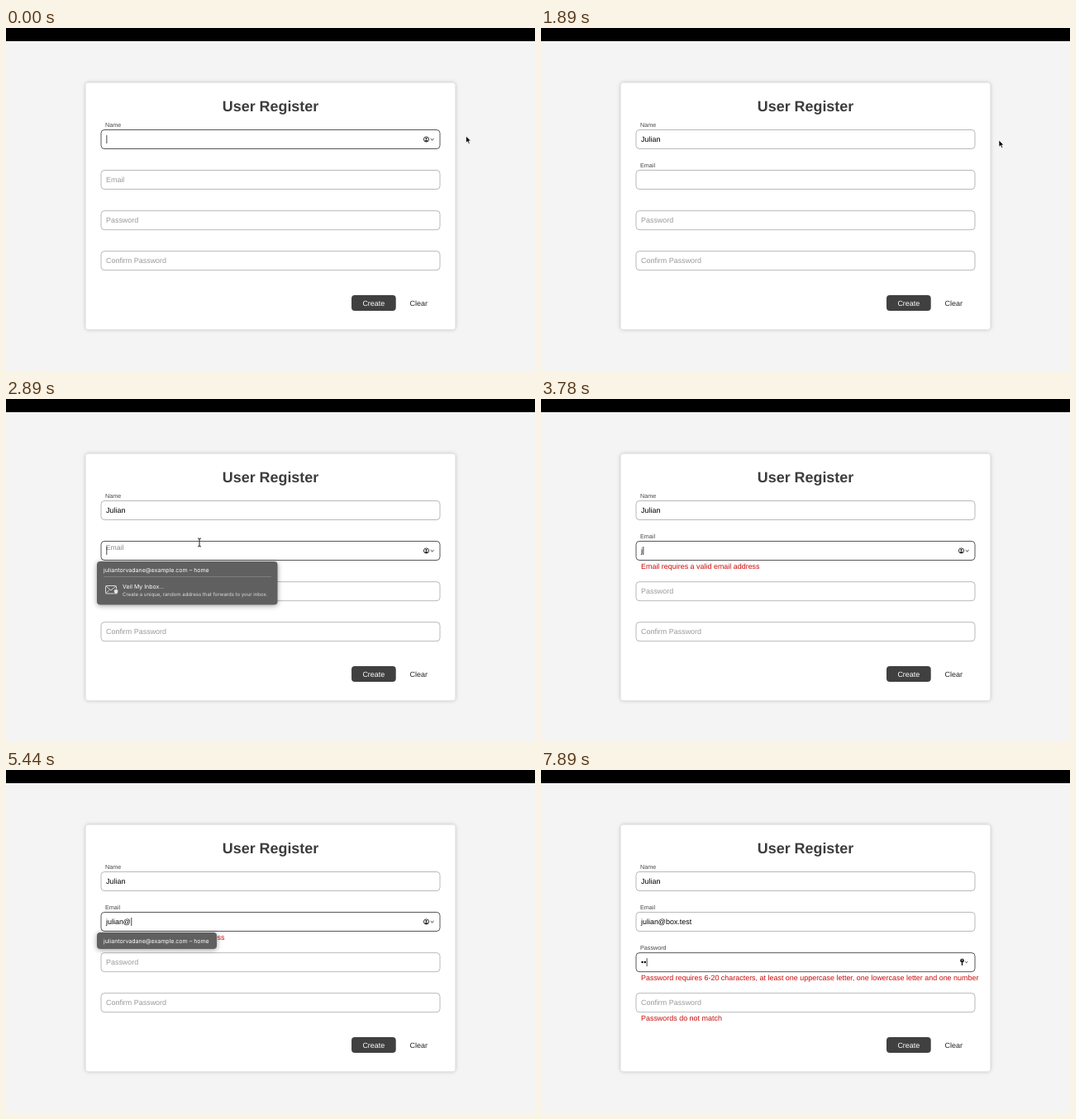
These frames come from a looping animation (640 px wide and 416 px high, 8000 ms). An HTML page:

```html
<!DOCTYPE html>
<html lang="en">
<head>
<meta charset="utf-8">
<title>User Register</title>
<style>
  html, body { margin: 0; width: 100%; height: 100%; overflow: hidden; background: #f4f4f4; }
  svg { display: block; width: 640px; height: 416px; }
  text { font: 8.95px "Liberation Sans", Arial, sans-serif; text-rendering: geometricPrecision; white-space: pre; }
  .card { fill: #fff; filter: drop-shadow(0 0 2.5px rgba(0, 0, 0, .24)); }
  .title { font-size: 17.9px; font-weight: bold; fill: #3c3c3c; }
  .field { fill: #fff; stroke: #b9b9b9; }
  .field.on { stroke: #565656; }
  .hint { fill: #999; }
  .error { fill: #cb0a0a; }
  .panel { fill: #606060; filter: drop-shadow(0 1px 3px rgba(0, 0, 0, .4)); }
  .popup text { font: 7px Inter, sans-serif; fill: #fff; }
  .popup .sub { font-size: 6.05px; fill: #dcdcdc; }
  .rule { stroke: #858585; stroke-width: .8; }
  .line { fill: none; stroke: #222; }
</style>
</head>
<body>
<svg viewBox="0 0 640 416">
  <defs>
    <g id="person">
      <circle r="3.1" class="line" stroke-width=".9"/>
      <circle cy="-.8" r="1.1" fill="#222"/>
      <path d="M-2.1 1.9Q0-.2 2.1 1.9L0 3Z" fill="#222"/>
      <path d="M5.2-.8l1.9 1.8 1.9-1.8" class="line"/>
    </g>
  </defs>
  <rect width="640" height="416" fill="#f4f4f4"/>
  <rect width="640" height="16"/>
  <rect class="card" x="96.5" y="66.5" width="447" height="299" rx="3.5"/>
  <text class="title" x="320" y="101.3" text-anchor="middle">User Register</text>

  <g id="fields"></g>
  <text x="120" y="119.6" style="font-size:7.2px" fill="#444">Name</text>
  <text id="emailLabel">Email</text>
  <text id="passLabel">Password</text>
  <text class="hint" x="121" y="284.7">Confirm Password</text>

  <text id="name" x="121" y="137.8"></text>
  <text id="email" x="121" y="187"></text>
  <text id="pass" x="121" y="236"></text>
  <rect id="caret" width=".9" height="10" fill="#333"/>

  <use id="nameIcon" href="#person" x="508.5" y="135"/>
  <use id="emailIcon" href="#person" x="508.5" y="184"/>
  <g id="passIcon" transform="translate(509.5 233)">
    <circle cy="-1.8" r="2.4" fill="#222"/>
    <path d="M0 0V4" class="line" stroke-width="1.6"/>
    <circle cy="-2.6" r=".6" fill="#fff"/>
    <path d="M3.8-.6l1.4 1.3 1.4-1.3" class="line" stroke-width=".9"/>
  </g>

  <text id="emailError" class="error" x="121" y="206">Email requires a valid email address</text>
  <g id="passError">
    <text class="error" x="121" y="255">Password requires 6-20 characters, at least one uppercase letter, one lowercase letter and one number</text>
    <text class="error" x="121" y="304">Passwords do not match</text>
  </g>

  <rect x="418" y="324" width="53.7" height="19" rx="4" fill="#404040"/>
  <text x="444.8" y="336.6" text-anchor="middle" fill="#fff">Create</text>
  <text x="499.3" y="336.6" text-anchor="middle" fill="#222">Clear</text>

  <g id="namePopup" class="popup">
    <rect class="panel" x="110" y="148" width="123.5" height="49" rx="4"/>
    <rect x="119" y="157" width="16.5" height="13.5" rx="1.5" fill="#f0f0f0"/>
    <circle cx="124" cy="161.8" r="1.8" fill="#555"/>
    <path d="M120.5 168q3.5-5 7 0z" fill="#555"/>
    <circle cx="131" cy="162" r="1.9" fill="none" stroke="#777" stroke-width=".8"/>
    <path d="M129 167.5h4.5" stroke="#999" stroke-width=".8"/>
    <text x="141" y="161.8">Julian Torvadane – Home</text>
    <text class="sub" x="141" y="171">Fill email.</text>
    <path class="rule" d="M118 178H225.5"/>
    <text x="118" y="189.2">Customize...</text>
  </g>

  <g id="emailPopup" class="popup">
    <rect id="emailPanel" class="panel" x="110" y="197" rx="4"/>
    <text x="118" y="210">juliantorvadane@example.com – home</text>
    <g id="emailMore">
      <path class="rule" d="M118 215.5H321"/>
      <g fill="none" stroke="#e4e4e4" stroke-width=".9">
        <rect x="120.5" y="226.5" width="13" height="9.5" rx="1.2"/>
        <path d="M121 227l6 5 6-5M121 235.5l4-4"/>
      </g>
      <path d="M130.5 231.5l2.6-1 2.6 1v2.6q-.4 2.2-2.6 3-2.2-.8-2.6-3z" fill="#e4e4e4" stroke="#606060" stroke-width=".7"/>
      <text x="141" y="230">Veil My Inbox...</text>
      <text class="sub" x="141" y="239.2">Create a unique, random address that forwards to your inbox.</text>
    </g>
  </g>

  <path id="arrow" d="M0 0V8.2L1.9 6.5 3.3 9.4 4.7 8.7 3.4 5.9H5.9Z" stroke="#fff" stroke-width=".7"/>
  <path id="beam" class="line" d="M-2-5Q0-5 0-3.8Q0-5 2-5M0-4V4M-2 5Q0 5 0 3.8Q0 5 2 5"/>
</svg>
<script>
const $ = id => document.getElementById(id);
const TICKS = 72, LOOP = 8000;

// All times below are in ticks, nine per second.
const typing = {
  name: ["Julian", [7, 8, 9, 10, 11, 12]],
  email: ["julian@box.test", [32, 36, 39, 42, 43, 45, 48, 50, 52, 55, 56, 60, 61, 62, 64]],
  pass: ["••", [69, 71]]
};
const focus = {
  name: [[0, 15]],
  email: [[18, 22], [26, 65]],
  pass: [[65, 72]]
};
const shown = {
  namePopup: [[7, 14]],
  emailPopup: [[18, 22], [26, 34], [48, 51]],
  emailMore: [[18, 22], [26, 31]],
  emailError: [[34, 62]],
  passError: [[69, 72]]
};
const caretOff = [[1, 3], [28, 30], [40, 42], [57, 59]];
const pointerOn = [[0, 5], [15, 34]];
const pointerPath = [
  [0, 556.5, 131], [3, 556.8, 140], [4, 557, 149], [15, 550, 141], [17, 554, 136],
  [20, 588, 172], [22, 590, 182], [25, 234, 174]
];
const rowTop = { name: 123.5, email: 172.5, pass: 221.7, confirm: 270.7 };

const boxes = {};
for (const [key, y] of Object.entries(rowTop)) {
  const box = document.createElementNS("http://www.w3.org/2000/svg", "rect");
  const attrs = { class: "field", x: 115, y, width: 410, height: 23, rx: 4 };
  for (const a in attrs) box.setAttribute(a, attrs[a]);
  boxes[key] = $("fields").appendChild(box);
}

const within = (spans, k) => spans.some(([a, b]) => k >= a && k < b);
const show = (id, on) => $(id).setAttribute("visibility", on ? "inherit" : "hidden");
const clamp = v => Math.max(0, Math.min(1, v));
const mix = (a, b, p) => a + (b - a) * p;

function placeLabel(id, top, p) {
  const el = $(id), grey = Math.round(mix(153, 68, p));
  el.setAttribute("x", mix(121, 120, p));
  el.setAttribute("y", mix(top + 14, top - 3.4, p));
  el.style.fontSize = mix(8.95, 7.2, p) + "px";
  el.style.fill = `rgb(${grey},${grey},${grey})`;
}

function pointerAt(k) {
  const i = pointerPath.findIndex(p => p[0] > k);
  if (i < 0) return pointerPath.at(-1).slice(1);
  const [t0, x0, y0] = pointerPath[i - 1], [t1, x1, y1] = pointerPath[i];
  const p = (k - t0) / (t1 - t0);
  return [mix(x0, x1, p), mix(y0, y1, p)];
}

function draw(k) {
  show("caret", false);
  for (const key in typing) {
    const [word, times] = typing[key], el = $(key), on = within(focus[key], k);
    el.textContent = word.slice(0, times.filter(t => t <= k).length);
    boxes[key].classList.toggle("on", on);
    show(key + "Icon", on);
    if (on) {
      const len = el.textContent ? el.getComputedTextLength() : 0;
      $("caret").setAttribute("x", 121.4 + len);
      $("caret").setAttribute("y", rowTop[key] + 6.5);
      show("caret", !within(caretOff, k));
    }
  }
  for (const id in shown) show(id, within(shown[id], k));
  if (!within(shown.emailPopup, k)) show("emailMore", false);

  const large = within(shown.emailMore, k);
  $("emailPanel").setAttribute("width", large ? 218.5 : 145);
  $("emailPanel").setAttribute("height", large ? 52.5 : 20);

  const rise = start => clamp((k - start) / 2);
  placeLabel("emailLabel", rowTop.email, k < 22 ? rise(15) : k < 25 ? 1 - rise(22) : rise(25.6));
  placeLabel("passLabel", rowTop.pass, rise(64));

  const [x, y] = pointerAt(k), inField = x < 525, on = within(pointerOn, k);
  show("arrow", on && !inField);
  show("beam", on && inField);
  for (const id of ["arrow", "beam"]) $(id).setAttribute("transform", `translate(${x} ${y})`);
}

let last = -1;
const start = performance.now();
function frame() {
  const t = (performance.now() - start) % LOOP;
  const k = Math.floor(t * TICKS / LOOP + .05) % TICKS;
  if (k !== last) draw(last = k);
  requestAnimationFrame(frame);
}
frame();
</script>
</body>
</html>
```
